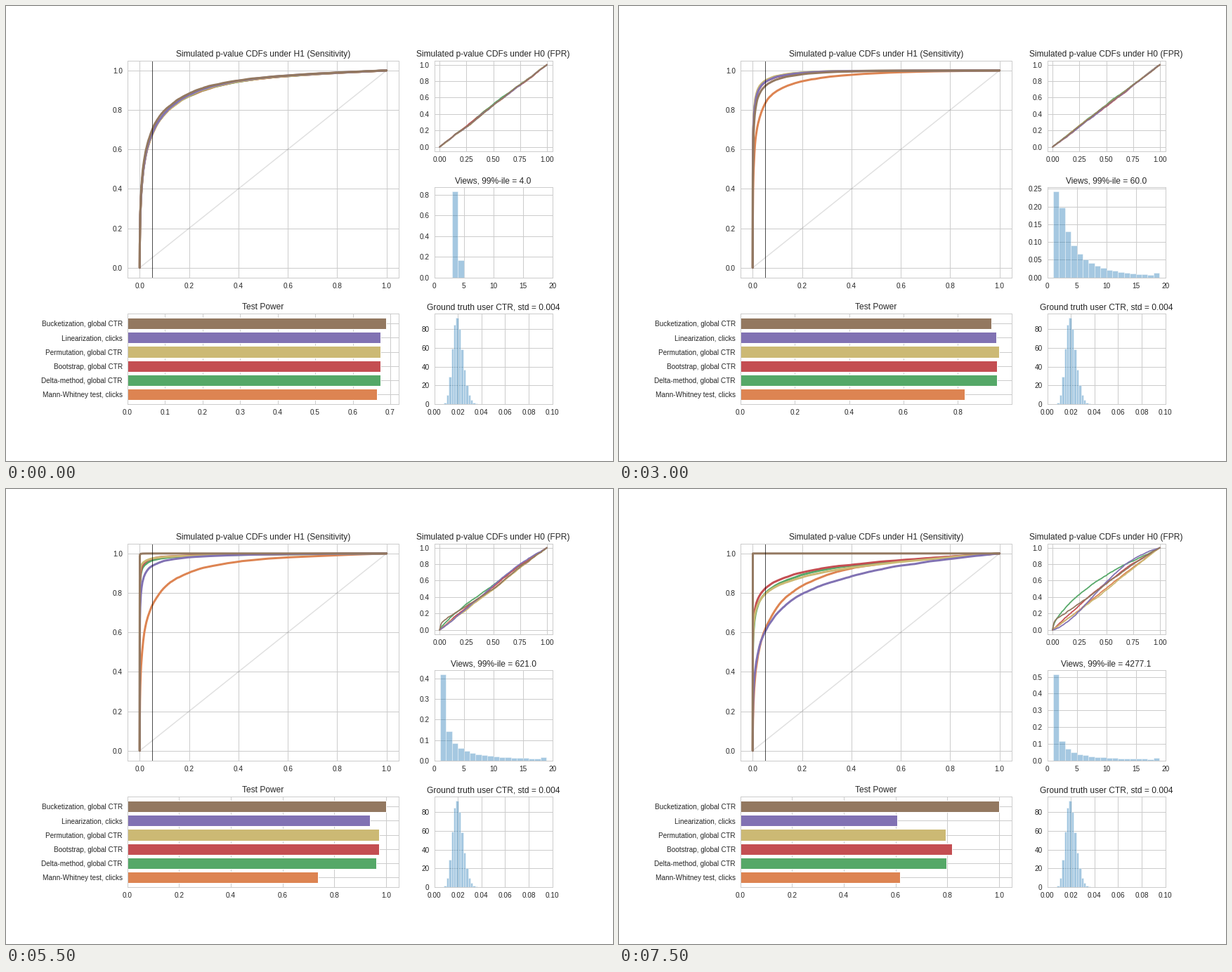
These frames come from a looping animation (864 px wide and 648 px high, 8000 ms). A matplotlib script:

```python
import math

import numpy as np
import matplotlib.pyplot as plt
from matplotlib.animation import FuncAnimation
from matplotlib.gridspec import GridSpec

FRAMES, INTERVAL = 16, 500

plt.rcParams.update({
    "font.family": "Liberation Sans", "text.color": ".15",
    "axes.edgecolor": ".8", "axes.linewidth": 1, "axes.grid": True,
    "axes.axisbelow": True, "axes.titlesize": 12, "axes.titlepad": 6,
    "grid.color": ".8", "grid.linewidth": 1, "grid.linestyle": "-",
    "xtick.color": ".15", "ytick.color": ".15",
    "xtick.labelsize": 10, "ytick.labelsize": 10,
    "xtick.major.size": 0, "ytick.major.size": 0,
    "xtick.major.pad": 7, "ytick.major.pad": 7,
    "lines.solid_capstyle": "round",
})

METHODS = [
    ("Mann-Whitney test, clicks", "#DD8452"),
    ("Delta-method, global CTR", "#55A868"),
    ("Bootstrap, global CTR", "#C44E52"),
    ("Permutation, global CTR", "#CCB974"),
    ("Linearization, clicks", "#8172B3"),
    ("Bucketization, global CTR", "#937860"),
]
HIST_BLUE = "#1f77b4"

# Test power of each method at a few skewness steps
POWER_STEPS = [0, 2, 4, 6, 8, 10, 12, 15]
POWER = [
    [.6645, .707, .762, .825, .829, .778, .690, .6175],
    [.6745, .7238, .826, .945, .978, .9835, .925, .798],
    [.673, .7265, .826, .943, .980, .990, .937, .819],
    [.6745, .7345, .831, .951, .982, .987, .946, .794],
    [.6745, .725, .8237, .941, .975, .9735, .870, .6065],
    [.6884, .708, .811, .923, .977, .9967, 1, 1],
]
# Spread of the test statistic
SPREAD_STEPS = [6, 10, 12, 15]
SPREAD = [
    [1, 1, 1, 1],
    [1, 1.4, 1.8, 1.8],
    [1, 1.4, 1.6, 1.95],
    [1, 1.6, 2.5, 2.1],
    [1, 1.15, 1.3, 1.25],
    [1, 1, 1, 1],
]
VIEWS_P99 = [4, 6, 9, 14, 23, 37, 60, 96, 152, 244, 385, 621, 988,
             1612, 2600, 4277.1]

phi = np.vectorize(lambda z: 0.5 * math.erfc(-z / math.sqrt(2)))
Z_TABLE = np.linspace(-5, 5, 2001)
PHI_TABLE = phi(Z_TABLE)
Z = np.linspace(6, 0, 500)
P_VALUES = 2 * phi(-Z)
X0 = np.linspace(0, 1, 300)


def probit(p):
    return np.interp(p, PHI_TABLE, Z_TABLE)


def bridge(rng, n=400):
    walk = np.cumsum(rng.normal(size=n)) / math.sqrt(n)
    walk -= walk[0]
    return walk - np.linspace(0, 1, n) * walk[-1]


def add_noise(y, noise):
    y = y + np.interp(y, np.linspace(0, 1, len(noise)), noise)
    return np.maximum.accumulate(np.clip(y, 0, 1))


def power_score(m, k):
    return np.interp(k, POWER_STEPS, probit(POWER[m]))


def power(m, k):
    score = power_score(m, k)
    return 1.0 if score > 4.9 else float(phi(score))


def h1_cdf(m, k, noise):
    tau = np.interp(k, SPREAD_STEPS, SPREAD[m])
    mu = 1.96 + tau * power_score(m, k)
    y = phi((mu - Z) / tau) + phi((-mu - Z) / tau)
    return np.r_[0, P_VALUES], np.r_[0, add_noise(y, noise)]


def h0_cdf(m, k, noise):
    x = X0
    grow = max(0, (k - 8) / 7) ** 1.3
    jump = min(1, max(0, (k - 7) / 5))
    shift = [
        0 * x,
        .52 * grow * np.sqrt(x) * (1 - x) ** 1.3,
        .26 * grow * x * (1 - x),
        -.10 * grow * x * (1 - x),
        grow * (.16 * np.sin(np.pi * x) - 1.17 * x * (1 - x) ** 3),
        .1 * jump * (1 - x) ** 3 * (1 - np.exp(-x / .01))
        + .12 * grow * x * (1 - x),
    ][m]
    return x, add_noise(np.clip(x + shift, 0, 1), noise)


def views_density(k):
    # floor(lognormal) + 1, counted in unit bins up to 19
    sigma = 1.02 * (.1 + .2 * k)
    cdf = np.r_[0, phi((np.log(np.arange(1, 20)) - 1) / sigma)]
    mass = np.diff(cdf)
    heights = np.r_[0, mass[:18]]
    heights[-1] += mass[18]
    return heights / heights.sum()


def ctr_density(edges, a=20.5):
    b = 49 * a
    x = np.linspace(edges[:-1], edges[1:], 12)[1:-1]
    log_norm = math.lgamma(a + b) - math.lgamma(a) - math.lgamma(b)
    pdf = np.exp(log_norm + (a - 1) * np.log(x) + (b - 1) * np.log1p(-x))
    return pdf.mean(axis=0)


fig = plt.figure(figsize=(12, 9), dpi=72, facecolor="white")
grid = GridSpec(3, 3, figure=fig, left=.2, right=.9, bottom=.125, top=.88,
                wspace=.3, hspace=.4)
ax_h1 = fig.add_subplot(grid[:2, :2])
ax_h0 = fig.add_subplot(grid[0, 2])
ax_views = fig.add_subplot(grid[1, 2])
ax_power = fig.add_subplot(grid[2, :2])
ax_ctr = fig.add_subplot(grid[2, 2])

for ax in (ax_h1, ax_h0):
    ax.set(xlim=(-.05, 1.05), ylim=(-.05, 1.05))
ax_h1.set_title("Simulated p-value CDFs under H1 (Sensitivity)")
ax_h0.set_title("Simulated p-value CDFs under H0 (FPR)")
ax_power.set_title("Test Power")
ax_ctr.set_title("Ground truth user CTR, std = 0.004")

ax_h1.plot([0, 1], [0, 1], color="k", alpha=.12, lw=1.5)
h1_lines = [ax_h1.plot([], [], color=c, lw=3)[0] for _, c in METHODS]
h0_lines = [ax_h0.plot([], [], color=c, lw=1.75)[0] for _, c in METHODS]
ax_h1.axvline(.05, color="k", alpha=.7, lw=1)

rows = np.arange(len(METHODS))
power_bars = ax_power.barh(rows, np.ones(len(rows)), height=.8,
                           color=[c for _, c in METHODS],
                           edgecolor="white", linewidth=1)
ax_power.set_yticks(rows, [name for name, _ in METHODS])
ax_power.set_ylim(-.69, 5.69)

hist_style = dict(align="edge", color=HIST_BLUE, edgecolor="white",
                  linewidth=1, alpha=.4)
views_bars = ax_views.bar(np.arange(19), np.ones(19), width=1, **hist_style)
ax_views.set_xlim(0, 20)
ax_views.set_xticks(range(0, 21, 5))

ctr_edges = np.linspace(0, .1, 50)
ctr_heights = ctr_density(ctr_edges)
ax_ctr.bar(ctr_edges[:-1], ctr_heights, width=ctr_edges[1], **hist_style)
ax_ctr.set(xlim=(0, .1), ylim=(0, 1.05 * ctr_heights.max()))
ax_ctr.set_xticks(np.linspace(0, .1, 6))


def update(k):
    rng = np.random.default_rng(100 + k)
    common1, common0 = bridge(rng), bridge(rng)
    for m in range(len(METHODS)):
        noise1 = .008 * common1 + .006 * bridge(rng)
        noise0 = .014 * common0 + .014 * bridge(rng)
        h1_lines[m].set_data(*h1_cdf(m, k, noise1))
        h0_lines[m].set_data(*h0_cdf(m, k, noise0))

    powers = [power(m, k) for m in range(len(METHODS))]
    for bar, value in zip(power_bars, powers):
        bar.set_width(value)
    ax_power.set_xlim(0, 1.05 * max(powers))

    heights = views_density(k)
    for bar, value in zip(views_bars, heights):
        bar.set_height(value)
    ax_views.set_ylim(0, 1.05 * heights.max())
    ax_views.set_title(f"Views, 99%-ile = {VIEWS_P99[k]:.1f}")
    return []


anim = FuncAnimation(fig, update, frames=FRAMES, interval=INTERVAL,
                     init_func=lambda: update(0), repeat=True,
                     repeat_delay=0, blit=False)
plt.show()
```
